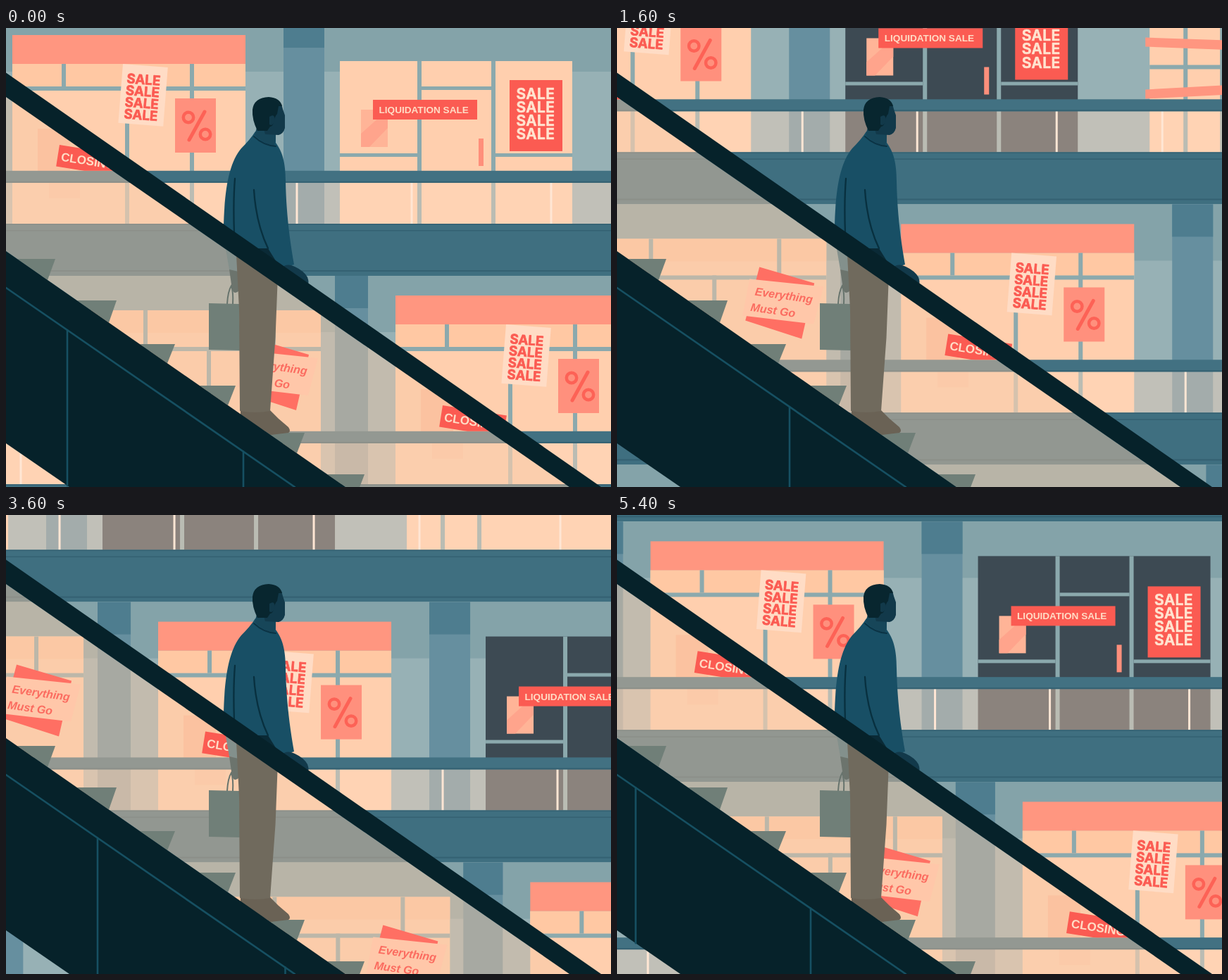
These frames come from a looping animation (859 px wide and 652 px high, 5.6 s). An HTML page:

```html
<!DOCTYPE html>
<html lang="en">
<head>
<meta charset="utf-8">
<title>Escalator</title>
<style>
  html, body { margin: 0; width: 100%; height: 100%; overflow: hidden; background: #84a3a9; }
  svg { display: block; width: 859px; height: 652px; }
  .sale { font: 700 18.8px Inter, sans-serif; stroke-width: .7; stroke-linejoin: round; }
  .label { font: bold 13.6px "Liberation Sans", Arial, sans-serif; }
  .note { font: italic bold 16px "Liberation Sans", Arial, sans-serif; fill: #fb6b5f; }
</style>
</head>
<body>
<svg id="stage" viewBox="0 0 859 652"></svg>
<script>
const NS = 'http://www.w3.org/2000/svg';
const C = {
  wall: '#97b1b5', wallTop: '#84a3a9', pillar: '#668f9f', pillarTop: '#4e7d8f',
  frame: '#8ba9ad', peach: '#ffcfae', peachTop: '#ffc8a3', pink: '#ff9680',
  red: '#fb5b52', cream: '#ffdcc5', slab: '#3f6f80', line: '#346172',
  dark: '#06222a', trim: '#165062', unlit: '#3d4a53', step: '#707f78',
  skin: '#12394a', sweater: '#184f65', fold: '#08303f'
};
const RAIL = 192.8;

function add(parent, tag, attrs, text) {
  const el = document.createElementNS(NS, tag);
  for (const k in attrs) el.setAttribute(k, attrs[k]);
  if (text) el.textContent = text;
  parent.appendChild(el);
  return el;
}
const group = (p, x, y, turn = 0) => add(p, 'g', { transform: `translate(${x} ${y}) rotate(${turn})` });
const box = (p, x, y, width, height, fill) => add(p, 'rect', { x, y, width, height, fill });
const poly = (p, points, fill) => add(p, 'polygon', { points, fill });
const path = (p, d, fill) => add(p, 'path', { d, fill });
const stroke = (p, d, color, width) => add(p, 'path', {
  d, fill: 'none', stroke: color, 'stroke-width': width, 'stroke-linecap': 'round'
});

function saleLines(p, x, y, gap, color, attrs) {
  for (let i = 0; i < 4; i++) {
    add(p, 'text', { x, y: y + i * gap, class: 'sale', fill: color, stroke: color, ...attrs }, 'SALE');
  }
}

function pillar(p, x, w) {
  box(p, x, -28, w, 296, C.pillar);
  box(p, x, -28, w, 46, C.pillarTop);
}

function panes(p, x, top, end) {
  box(p, x + 70, top, 6, 73 - top, C.frame);
  box(p, x + 160, 73, 6, 195, C.frame);
  box(p, x + 252, top, 6, end - top, C.frame);
}

function cornerShop(p) {
  box(p, 0, 41, 331, 227, C.peach);
  box(p, 0, 41, 331, 32, C.peachTop);
  box(p, 0, 0, 331, 41, C.pink);
  box(p, 0, 73, 331, 6, C.frame);
  panes(p, 0, 41, 268);
  box(p, 36, 133, 46, 61, '#ffbd9c');
  box(p, 52, 194, 44, 38, '#ffc4a2');

  const poster = group(p, 157, 41, 4.5);
  box(poster, 0, 0, 64, 84, C.cream);
  saleLines(poster, 7, 26.5, 16.8, C.red);

  box(p, 231, 90, 58, 77, '#ff907d');
  const mark = '#fd6256';
  for (const [cx, cy] of [[250, 117], [274, 141]]) {
    add(p, 'circle', { cx, cy, r: 7.2, fill: 'none', stroke: mark, 'stroke-width': 4.5 });
  }
  stroke(p, 'M273 109L251 149', mark, 5);
}

function noticeShop(p, left) {
  const width = -106 - left;
  box(p, left, 21, width, 247, C.peach);
  box(p, left, 21, width, 32, C.peachTop);
  box(p, left, 73, width, 6, C.frame);
  panes(p, -428, 21, 73);
}

function doorShop(p, top) {
  const height = 268 - top;
  const glass = box(p, 465, top, 330, height, C.unlit);
  box(p, 575, top, 6, height, C.frame);
  box(p, 680, top, 6, height, C.frame);
  box(p, 465, 168, 110, 5, C.frame);
  box(p, 686, 168, 109, 5, C.frame);
  box(p, 581, 73, 99, 5, C.frame);
  box(p, 495, 106, 38, 53, '#ffb497');
  poly(p, '495,140 533,106 533,132 507,159 495,159', '#ffa48c');
  box(p, 512, 92, 148, 28, C.red);
  add(p, 'text', { x: 520.5, y: 111, class: 'label', fill: C.cream }, 'LIQUIDATION SALE');
  box(p, 662, 147, 7, 39, '#ff8f7b');
  box(p, 706, 64, 75, 101, C.red);
  saleLines(p, 715.5, 90.5, 19.2, '#ffe4d0', { style: 'font-size:21px;font-weight:600;letter-spacing:.4px' });
  return glass;
}

function boardedShop(p) {
  box(p, 897, 37, 400, 231, C.peach);
  box(p, 897, 144, 400, 6, C.frame);
  box(p, 945, 37, 6, 231, C.frame);
  box(p, 997, 37, 6, 231, C.frame);
  poly(p, '891,105 1090,112 1090,126 891,118', C.pink);
  poly(p, '891,179 1090,168 1090,182 891,192', C.pink);
}

// One storey; its origin is the top left of the awning.
function storey(parent, { x, y, shift, pillarWidth, noticeLeft, doorTop }) {
  const p = group(parent, x, y);
  box(p, -1200, -28, 2600, 296, C.wall);
  box(p, -1200, -28, 2600, 80, C.wallTop);
  pillar(p, -778, 58);
  box(p, -1100, 30, 300, 238, C.peach);
  pillar(p, -39 - pillarWidth, pillarWidth);
  pillar(p, 385, 58);
  noticeShop(group(p, shift, 0), noticeLeft);
  cornerShop(p);
  const glass = doorShop(p, doorTop);
  boardedShop(p);
  box(p, -1200, 209, 2600, 59, 'rgba(255,214,187,.4)');
  for (const post of [-532, 404, 567, 765, 915, 1115]) box(p, post - 1.5, 209, 3, 59, '#ffe6d4');
  box(p, -1200, RAIL, 2600, 17, '#427182');
  box(p, -1200, RAIL + 15, 2600, 2, C.line);
  box(p, -1200, 268, 2600, 74, C.slab);
  box(p, -1200, 268, 2600, 1.5, C.line);
  box(p, -1200, 277, 2600, 1.5, C.line);
  box(p, -1200, 334, 2600, 2, C.line);
  return glass;
}

// Signs that keep their full colour through the escalator glass
function brightSigns(parent, { x, y, shift }) {
  const p = group(parent, x, y);
  p.setAttribute('clip-path', 'url(#aboveRail)');
  const closing = group(p, 67, 156, 9);
  box(closing, 0, 0, 92, 31, C.red);
  add(closing, 'text', {
    x: 5, y: 22, fill: C.cream, class: 'label', style: 'font-size:17px'
  }, 'CLOSING');

  const notice = group(p, shift, 0);
  poly(notice, '-201,61 -123,84 -141,163 -221,137', '#ff6f63');
  poly(notice, '-215,78 -110,89 -124,142 -225,130', '#ffc7a9');
  const note = group(notice, -208, 101, 8);
  add(note, 'text', { x: 0, y: 0, class: 'note' }, 'Everything');
  add(note, 'text', { x: -3, y: 23, class: 'note' }, 'Must Go');
}

const storeys = [
  { x: 9, y: 10, shift: 0, pillarWidth: 47, noticeLeft: -560, doorTop: 37 },
  { x: 553, y: 380, shift: 0, pillarWidth: 47, noticeLeft: -560, doorTop: 21 },
  { x: 1081.3, y: 750, shift: -8, pillarWidth: 56, noticeLeft: -440, doorTop: 21 }
];

const stage = document.getElementById('stage');
box(add(stage, 'clipPath', { id: 'aboveRail' }), -1200, -28, 2600, RAIL + 28);
const mall = group(stage, 0, 0);
const [shopLight] = storeys.map(s => storey(mall, s));

// Glass side of the escalator, and the steps seen through it.
poly(stage, '0,98 800,652 482,652 0,317', 'rgba(245,200,165,.45)');
const signs = group(stage, 0, 0);
storeys.forEach(s => brightSigns(signs, s));
const edge = x => 317 + x * .695;
for (const [x, y] of [[70, 328], [157, 387], [240, 449], [326, 508], [424, 575], [509, 634]]) {
  poly(stage, `${(y - 317) / .695},${y} ${x},${y} ${x - 11},${edge(x - 11)}`, C.step);
}

// Bag, legs and the far hand
stroke(stage, 'M314 392Q315 374 320 366Q323 376 322 392', '#66736c', 2);
poly(stage, '288,391 331,392 333,458 288,457', C.step);
path(stage, 'M312 314L332 328L330 347L317 343Z', '#83908c');
path(stage, 'M317 343L330 346L331 373Q324 380 321 371Z', '#6c746d');
path(stage, 'M333 540L374 542Q386 555 401 567Q405 573 401 575L376 578L333 551Z', '#6a6255');
path(stage, 'M327 322L386 350L382.5 440L375 544Q354 548 332 544L331 400Z', '#706a5d');

// Upper body
path(stage, 'M356 313L374 312L392 345L386 352L350 330Z', '#0a2a36');
path(stage, 'M354 147Q347 158 334 171C317 191 310 229 309 284L330 304L358 313L372 313L390 342L409 336C402 296 398 262 397 218C397 190 392 175 383 163L383 150Z', C.sweater);
path(stage, 'M357 138L353 152Q362 162 381 168L384 145Z', '#174659');
stroke(stage, 'M352 154Q366 167 383 168', '#0b3344', 2);
stroke(stage, 'M325 214C323 240 323 264 324 291', C.fold, 2.3);
stroke(stage, 'M352 230C354 262 361 290 372 313', C.fold, 2.3);
path(stage, 'M360 120Q372 104 391 108Q393 116 396 124L396 142Q394 150 387 152L368 151Z', C.skin);
path(stage, 'M357 146Q349 130 350 116Q352 99 373 98Q389 99 392 111L387 111L385 122Q382 125 381 131Q379 140 375 140L371 146Z', '#08262f');
path(stage, 'M374 126Q381 121 382 130Q379 141 374 137Z', C.skin);
path(stage, 'M389 341Q400 333 410 339Q423 345 428 354Q431 362 428 366L389 350Z', C.skin);

poly(stage, '0,63.5 845,652 800,652 0,98', C.dark);

poly(stage, '0,317 482,652 90,652 0,590', C.dark);
const trimTop = x => 369 + x * .69;
stroke(stage, 'M0 369L410 652', C.trim, 2.6);
const seams = [[87, 11.4], [337, 11.5], [639.5, 13.5]].map(([start, speed]) => ({
  start, speed, el: stroke(stage, '', C.trim, 2.6)
}));

const STEP = 200, STEPS = 28, LIGHTS_OUT = 7;

function draw(now) {
  const i = Math.floor(now / STEP) % STEPS;
  const move = `translate(${-18.72 * i} ${-12.69 * i})`;
  mall.setAttribute('transform', move);
  signs.setAttribute('transform', move);
  shopLight.setAttribute('fill', i < LIGHTS_OUT ? C.peach : C.unlit);
  for (const { start, speed, el } of seams) {
    const x = start - speed * i;
    const show = x > 0 && x < 409;
    el.setAttribute('d', show ? `M${x} ${trimTop(x)}V${Math.min(652, 590 + x * .69)}` : '');
  }
}

const begin = performance.now();
function tick() {
  draw(performance.now() - begin);
  requestAnimationFrame(tick);
}
tick();
</script>
</body>
</html>
```
